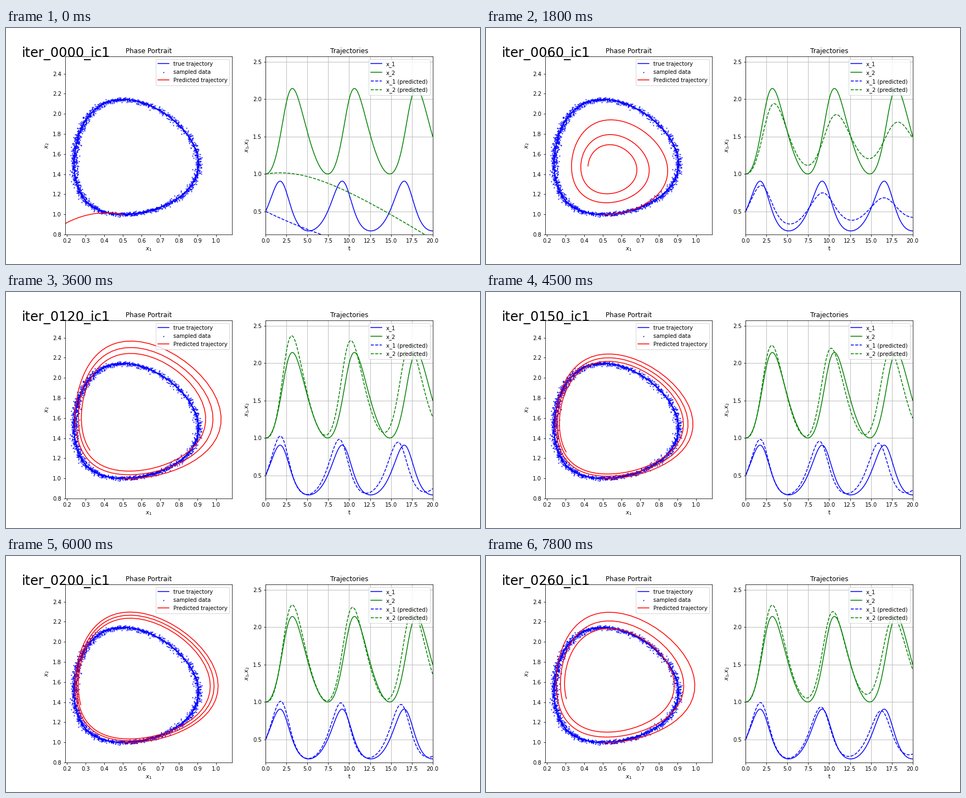
Recreate the animation shown at these times as a matplotlib script. Size 864x432 px, loop 8 s.

```python
import matplotlib.pyplot as plt
import numpy as np
from matplotlib.animation import FuncAnimation

DT, STEPS = 0.1, 200
TIMES = np.arange(STEPS + 1) * DT
HOLD = 3  # animation frames per training snapshot

# Orbit centre (x, y), growth rates of x and y, damping.
TRUE_MODEL = (0.5, 1.5, 1.5, 0.5, 0)
LEARNED = {
    60: (0.53, 1.455, 1.34, 0.55, 0.045),
    100: (0.545, 1.633, 1.526, 0.551, 0.0138),
    150: (0.528, 1.543, 1.568, 0.525, 0.0071),
    180: (0.5425, 1.563, 1.563, 0.53, 0.0052),
    220: (0.53, 1.565, 1.495, 0.517, 0.0057),
    260: (0.528, 1.575, 1.52, 0.518, 0.0159),
}


def orbit(z, model):
    """Predator-prey field that spirals towards its centre."""
    x_mid, y_mid, x_rate, y_rate, damping = model
    u, v = z[0] / x_mid, z[1] / y_mid
    pull = damping * np.log(np.maximum([u, v], 1e-3))
    return z * (np.array([x_rate * (1 - v), y_rate * (u - 1)]) - pull)


def drift(z):
    """Field of the untrained model."""
    x = z[0]
    return np.array([-0.0306 - 0.0468 * x, 0.072 * np.tanh(2.8 * (x - 0.41))])


def integrate(field):
    """RK4 path from (0.5, 1); returns its x and y series."""
    z = np.array([0.5, 1.0])
    path = [z]
    for _ in range(STEPS):
        k1 = field(z)
        k2 = field(z + DT / 2 * k1)
        k3 = field(z + DT / 2 * k2)
        k4 = field(z + DT * k3)
        z = np.clip(z + DT / 6 * (k1 + 2 * k2 + 2 * k3 + k4), -2, 6)
        path.append(z)
    return np.array(path).T


def predict(iteration):
    model = [np.interp(iteration, list(LEARNED), values)
             for values in zip(*LEARNED.values())]
    trained = min(iteration / 60, 1)
    return integrate(lambda z: trained * orbit(z, model)
                     + (1 - trained) * drift(z))


predictions = [predict(10 * k) for k in range(27)]

x_true, y_true = integrate(lambda z: orbit(z, TRUE_MODEL))
rng = np.random.default_rng(4)
sample_t = np.linspace(0, 20, 2000)
x_data, y_data = (np.interp(sample_t, TIMES, s) + rng.normal(0, 0.01, 2000)
                  for s in (x_true, y_true))

fig, (phase, series) = plt.subplots(1, 2, figsize=(12, 6), dpi=72)
fig.subplots_adjust(left=0.125, right=0.9001, bottom=0.125, top=0.88,
                    wspace=0.2)
heading = fig.suptitle("", x=0.1262, y=0.922, fontsize=24)

x_low, x_high = 0.8 * x_true.min(), 1.2 * x_true.max()
y_low, y_high = 0.8 * y_true.min(), 1.2 * y_true.max()

phase.plot(x_true, y_true, "b", label="true trajectory")
phase.scatter(x_data, y_data, s=1, c="b", label="sampled data")
spiral, = phase.plot([], [], "r", label="Predicted trajectory")
phase.set(title="Phase Portrait", xlabel="$x_1$", ylabel="$x_2$",
          xlim=(x_low, x_high), ylim=(y_low, y_high))
legend = phase.legend(loc="upper right")

series.plot(TIMES, x_true, "b", label="x_1")
series.plot(TIMES, y_true, "g", label="x_2")
x_line, = series.plot([], [], "b--", label="x_1 (predicted)")
y_line, = series.plot([], [], "g--", label="x_2 (predicted)")
series.set(title="Trajectories", xlabel="t", ylabel="$x_1$,$x_2$",
           xlim=(0, 20), ylim=(x_low, y_high))
series.grid()
series.legend(loc="upper right")


def update(frame):
    step = frame // HOLD
    x, y = predictions[step]
    heading.set_text(f"iter_{10 * step:04d}_ic1")
    spiral.set_data(x, y)
    x_line.set_data(TIMES, x)
    y_line.set_data(TIMES, y)
    # The legend leaves its corner when the curve runs through it.
    covered = np.any((x > 0.68) & (y > 2.32))
    legend.set_loc("center" if covered else "upper right")
    return heading, spiral, x_line, y_line, legend


anim = FuncAnimation(fig, update, frames=80, interval=100, repeat=True)
plt.show()
```
